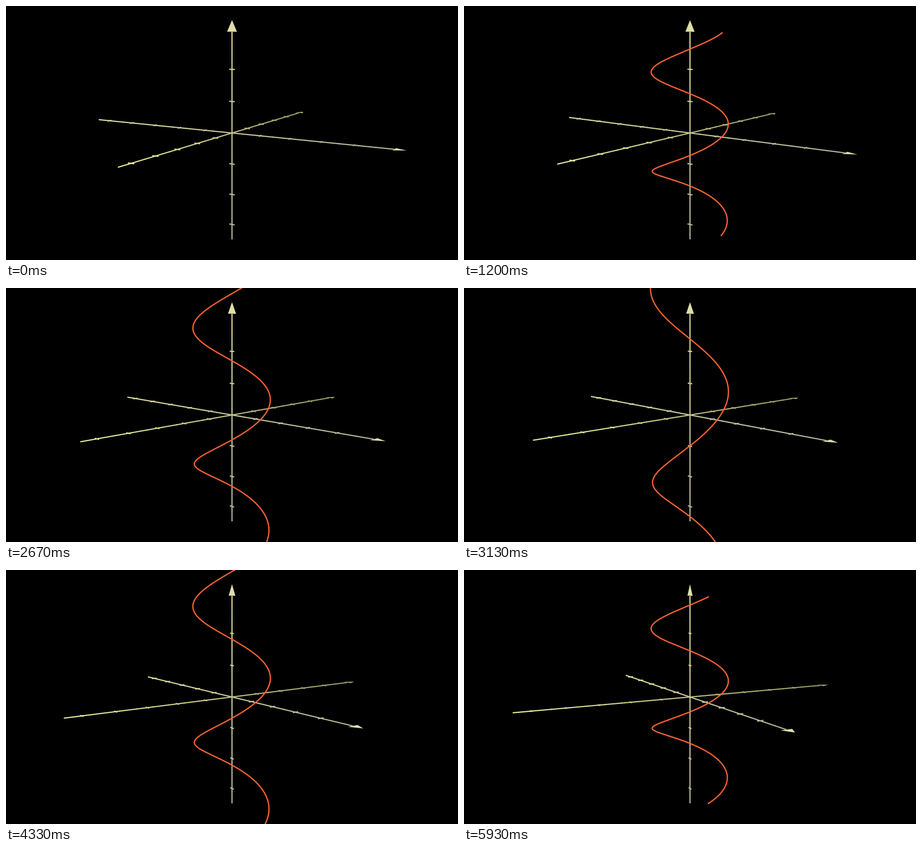
Recreate the animation shown at these times as a matplotlib script. Size 854 px wide and 480 px high, loop 5.99 s.

```python
import numpy as np
import matplotlib.pyplot as plt
from matplotlib.animation import FuncAnimation
from matplotlib.collections import LineCollection
from matplotlib.patches import Polygon

W, H, DPI = 854, 480, 64
FRAMES, LOOP = 90, 5990
FPS = 15
UNIT = 60                     # pixels per scene unit
FOCAL = 20
PHI = np.radians(80)
TURN = 0.1 / FPS              # camera turn per step, radians
DRAW_END, STRETCH, STRETCH_END = 15, 30, 75
PT = 72 / DPI                 # points per pixel
PIECES = 20
TIP_LEN, TIP_HALF, TICK = 0.35, 0.175, 0.1
CURVE_COLOR = "#fd6236"

# direction, cross direction, half length, colour at - end, at + end, tip
X, Y, Z = np.eye(3)
AXES = [
    (Y, X, 5.5, (238, 238, 162), (146, 146, 98), (176, 176, 112)),
    (X, Y, 5.5, (224, 224, 158), (180, 180, 154), (222, 222, 168)),
    (Z, X, 3.5, (184, 184, 160), (224, 224, 150), (222, 222, 170)),
]


def smooth(t):
    """Sigmoid ease from 0 to 1."""
    sig = lambda v: 1 / (1 + np.exp(-v))
    edge = sig(-5)
    return np.clip((sig(10 * (t - 0.5)) - edge) / (1 - 2 * edge), 0, 1)


def project(points, turn):
    """Scene points to stage pixels; turn is the angle of the x axis."""
    x, y, z = np.moveaxis(np.asarray(points, float), -1, 0)
    c, s = np.cos(turn), np.sin(turn)
    x, y = x * c - y * s, x * s + y * c
    up = y * np.cos(PHI) + z * np.sin(PHI)
    depth = z * np.cos(PHI) - y * np.sin(PHI)
    k = UNIT * FOCAL / (FOCAL - depth)
    return np.stack([W / 2 + x * k, H / 2 - up * k], axis=-1)


def camera_turn(i):
    # the first step of each scene part does not turn the camera
    steps = i - sum(i >= start for start in (DRAW_END, STRETCH, STRETCH_END))
    return np.radians(-30) - steps * TURN


def pitch(i):
    t = np.clip((i - STRETCH) / (STRETCH_END - STRETCH), 0, 1)
    return 0.5 + 0.5 * smooth(1 - abs(2 * t - 1))


def helix(i):
    shown = smooth(i / DRAW_END) if i < DRAW_END else 1
    u = np.linspace(-2 * np.pi, -2 * np.pi + 4 * np.pi * shown, 300)
    return np.stack([1.2 * np.cos(u), 1.2 * np.sin(u), pitch(i) * u], axis=-1)


def axis_segments(along, cross, half, low, high):
    """Pieces of the shaft, then the ticks, each with its colour."""
    low, high = np.array(low) / 255, np.array(high) / 255
    end = half - TIP_LEN
    stops = np.linspace(-half, end, PIECES + 1)
    segs, colors = [], []

    def add(p, q, pos):
        segs.append((p, q))
        colors.append(low + (high - low) * (pos + half) / (2 * half))

    for a, b in zip(stops[:-1], stops[1:]):
        add(along * a, along * min(b + 0.03, end), (a + b) / 2)
    for n in range(-int(half), int(half)):
        if n:
            add(along * n - cross * TICK, along * n + cross * TICK, n)
    return np.array(segs), colors


fig = plt.figure(figsize=(W / DPI, H / DPI), dpi=DPI, facecolor="black")
ax = fig.add_axes([0, 0, 1, 1])
ax.set(xlim=(0, W), ylim=(H, 0))
ax.axis("off")

parts = []
for along, cross, half, low, high, tip_color in AXES:
    segs, colors = axis_segments(along, cross, half, low, high)
    lines = LineCollection([], colors=colors, linewidths=2.2 * PT,
                           capstyle="butt")
    ax.add_collection(lines)
    base = along * (half - TIP_LEN)
    corners = np.array([base - cross * TIP_HALF, along * half,
                        base + cross * TIP_HALF])
    tip = ax.add_patch(Polygon(np.zeros((3, 2)), lw=0,
                               fc=np.array(tip_color) / 255))
    parts.append((lines, segs, tip, corners))

curve, = ax.plot([], [], color=CURVE_COLOR, lw=2.4 * PT, zorder=5,
                 solid_capstyle="butt", solid_joinstyle="round")


def update(i):
    turn = camera_turn(i)
    for lines, segs, tip, corners in parts:
        lines.set_segments(project(segs, turn))
        tip.set_xy(project(corners, turn))
    curve.set_data(*project(helix(i), turn).T)
    curve.set_visible(i > 0)
    return [curve]


anim = FuncAnimation(fig, update, frames=FRAMES, interval=LOOP / FRAMES,
                     repeat=True, repeat_delay=0)
plt.show()
```
